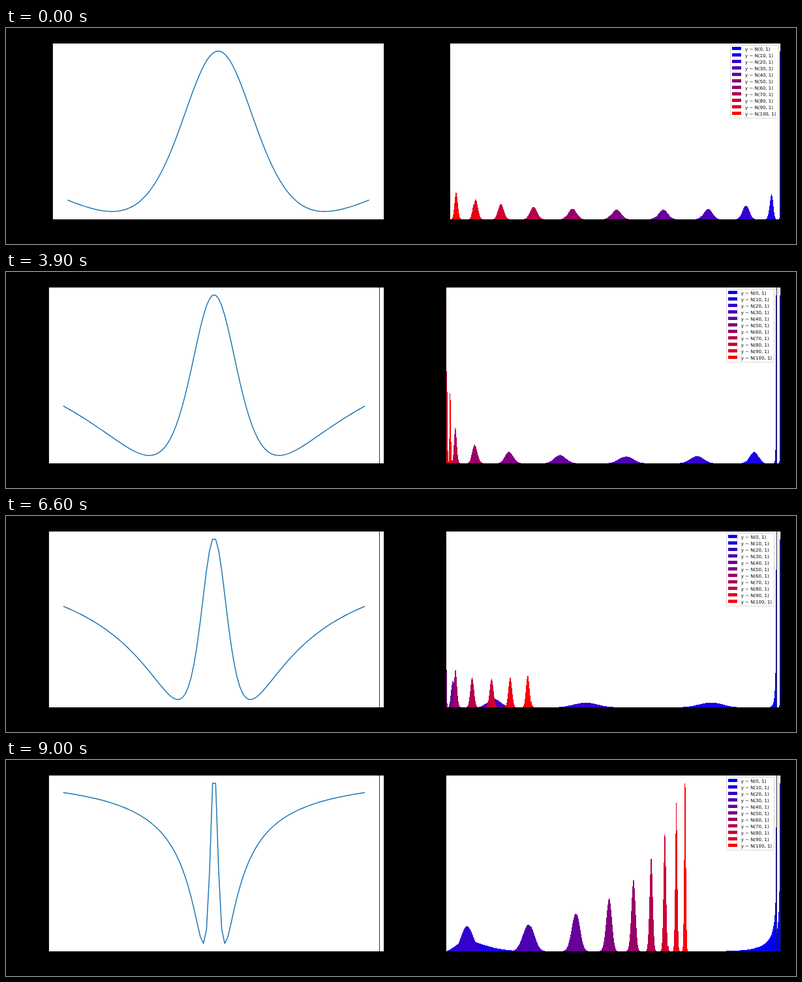
Write an HTML page that moves like this. It is 1211 by 333 pixels and loops after 9100 ms.

```html
<!DOCTYPE html>
<html lang="en">
<head>
<meta charset="utf-8">
<title>Curve and histograms</title>
<style>
  html, body { margin: 0; width: 100%; height: 100%; overflow: hidden; background: #000; }
  svg { display: block; }
  text { font: 7px "DejaVu Sans", sans-serif; }
</style>
</head>
<body>
<svg id="stage" width="1211" height="333" viewBox="0 0 1211 333"></svg>
<script>
const stage = document.getElementById('stage');
const STEP = 100, STEPS = 91;
const TOP = 23.4, H = 271.8, BASE = 295, W = 507.27;
const LEFT = 71.75, RIGHT = 680.47, SHIFT = 6.36;
const BINS = 500, SAMPLES = 1e5;
const MEANS = Array.from({ length: 11 }, (_, i) => i * 10);

// Weighted grid standing in for samples of a unit normal
const DZ = 0.001, ZMAX = 4.45;
const zs = [], weights = [];
for (let i = -ZMAX / DZ; i <= ZMAX / DZ; i++) {
  const z = i * DZ;
  zs.push(z);
  weights.push(Math.exp(-z * z / 2) * DZ / Math.sqrt(2 * Math.PI));
}

const curve = (x, a) => {
  const d = x * x + a * a;
  return (1 - x * x) / (d * Math.sqrt(d));
};

const colour = i => `rgb(${Math.round(25.5 * i)},0,${Math.round(255 - 25.5 * i)})`;

const isWide = n => n < 6 || (n > 76 && n < 82);

function ticks(x, lo, hi) {
  const raw = (hi - lo) / 9;
  const p = 10 ** Math.floor(Math.log10(raw));
  const step = p * [1, 2, 2.5, 5, 10].find(m => m * p >= raw);
  let d = '';
  for (let k = Math.ceil(lo / step); k * step <= hi; k++) {
    const y = Math.floor(TOP + H * (hi - k * step) / (hi - lo)) + 0.5;
    d += `M${x} ${y}h-3.5`;
  }
  return `<path d="${d}" stroke="#000" stroke-width=".8"/>`;
}

function panel(x, inner) {
  const l = Math.floor(x), w = Math.floor(x + W) - l;
  const box = `x="${l + 0.5}" y="23.5" width="${w}" height="272"`;
  return `<rect ${box} fill="#fff"/>${inner}` +
    `<rect ${box} fill="none" stroke="#000" stroke-width=".8"/>` +
    `<path d="M${l} 295h${w + 1}v1h-${w + 1}z"/>`;
}

function linePanel(x, a) {
  const ys = Array.from({ length: 100 }, (_, i) => curve(-200 + 400 * i / 99, a));
  const lo = Math.min(...ys), hi = Math.max(...ys), pad = (hi - lo) / 20;
  const pts = ys.map((v, i) => {
    const px = x + W / 22 + W / 1.1 * i / 99;
    const py = TOP + H * (hi + pad - v) / (hi - lo + 2 * pad);
    return px.toFixed(2) + ',' + py.toFixed(2);
  });
  return panel(x, `<polyline points="${pts.join(' ')}" fill="none" stroke="#1f77b4" ` +
    `stroke-width="1.5" stroke-linejoin="round" stroke-linecap="square"/>`) +
    ticks(Math.floor(x), lo - pad, hi + pad);
}

function histograms(a) {
  let lo = Infinity, hi = -Infinity;
  const values = MEANS.map(m => zs.map(z => {
    const v = curve(m + z, a);
    if (v < lo) lo = v;
    if (v > hi) hi = v;
    return v;
  }));
  return values.map(vs => {
    const bins = new Float64Array(BINS);
    vs.forEach((v, k) => {
      bins[Math.min(BINS - 1, Math.floor((v - lo) / (hi - lo) * BINS))] += weights[k];
    });
    return bins;
  });
}

function legend(x) {
  const r = x + W - 3.5, l = Math.floor(r - 73.4) + 0.5;
  const rows = MEANS.map((m, i) => {
    const y = 29 + 10 * i;
    return `<rect x="${l + 2.5}" y="${y}" width="14" height="5" fill="${colour(i)}"/>` +
      `<text x="${(r - 51.2).toFixed(2)}" y="${y + 5.7}">y ~ N(${m}, 1)</text>`;
  });
  return `<rect x="${l}" y="26.5" width="${Math.floor(r) + 0.5 - l}" height="112.5" rx="1.4" ` +
    `fill="#fff" stroke="#ccc" opacity=".8"/>` + rows.join('');
}

function histPanel(x, a) {
  const sets = histograms(a);
  const peak = Math.max(...sets.map(b => Math.max(...b)));
  const edge = k => Math.floor(x + W * k / BINS);
  const bars = sets.map((bins, i) => {
    let d = '';
    bins.forEach((v, k) => {
      const h = Math.round(v / peak * H / 1.05);
      if (h) d += `M${edge(k)} ${BASE}V${BASE - h}H${edge(k + 1)}V${BASE}z`;
    });
    return `<path d="${d}" fill="${colour(i)}"/>`;
  });
  return panel(x, bars.join('') + legend(x)) +
    ticks(Math.floor(x), 0, peak * SAMPLES * 1.05);
}

const cache = {};
function scene(n) {
  if (!cache[n]) {
    const dx = isWide(n) ? 0 : SHIFT, a = 100 - n;
    cache[n] = linePanel(LEFT - dx, a) + histPanel(RIGHT - dx, a);
  }
  return cache[n];
}

// The previous layout stays visible in the strips the present one leaves bare
function draw(n) {
  const under = n < 6 ? -1 : n < 77 ? 5 : n < 82 ? 76 : 81;
  stage.innerHTML = (under < 0 ? '' : scene(under)) + scene(n);
}

let shown = -1;
function tick() {
  const n = Math.floor(performance.now() / STEP) % STEPS;
  if (n !== shown) draw(shown = n);
  requestAnimationFrame(tick);
}
tick();
</script>
</body>
</html>
```
